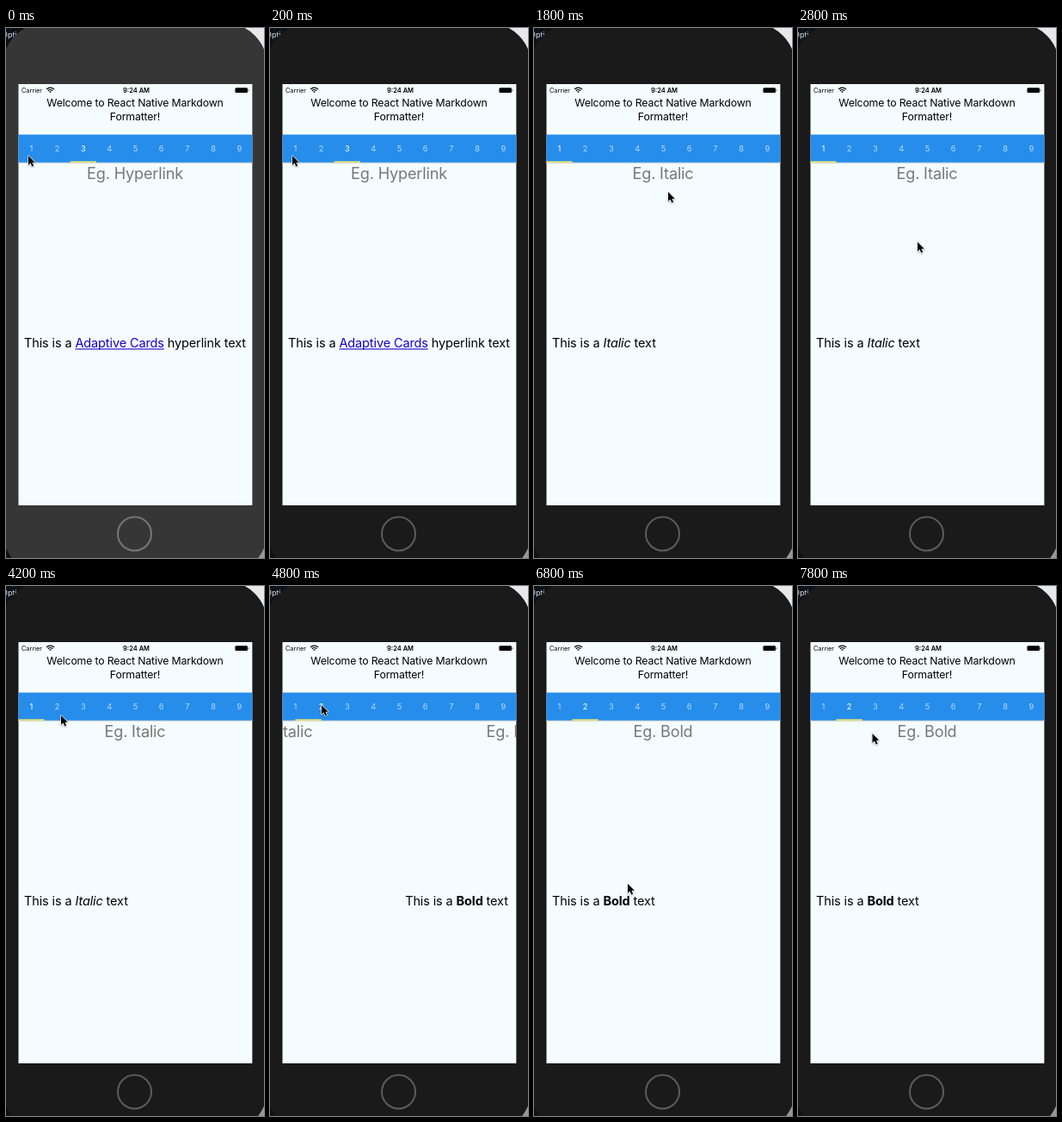
An HTML page with a canvas that plays this animation: 300 by 614 pixels, repeating every 8000 ms.

```html
<!DOCTYPE html>
<html lang="en">
<head>
<meta charset="utf-8">
<title>Markdown formatter demo</title>
<style>
  html, body { margin: 0; width: 100%; height: 100%; overflow: hidden; background: #0b1218; }
  canvas { display: block; width: 300px; height: 614px; }
</style>
</head>
<body>
<canvas id="stage"></canvas>
<script>
const W = 300, H = 614, LOOP = 8000, STEP = 200;
const FONT = 'Inter, Roboto, sans-serif';
const SCREEN = { x: 14.3, y: 65, w: 272.3, h: 488 };
const TAB_W = SCREEN.w / 9;
const LINK = '#1a00c8';

const canvas = document.getElementById('stage');
const ctx = canvas.getContext('2d');
const dpr = window.devicePixelRatio || 1;
canvas.width = W * dpr;
canvas.height = H * dpr;

const pages = [
  { title: 'Eg. Italic', parts: [['This is a '], ['Italic', 'italic'], [' text']] },
  { title: 'Eg. Bold', parts: [['This is a '], ['Bold', 'bold'], [' text']] },
  { title: 'Eg. Hyperlink', parts: [['This is a '], ['Adaptive Cards', 'link'], [' hyperlink text']] }
];

// Eased pointer moves
const home = { x: 26, y: 148 };
const moves = [
  { from: 600, to: 800, x: 30, y: 138 },
  { from: 1000, to: 1800, x: 156, y: 190 },
  { from: 1800, to: 2400, x: 161, y: 182 },
  { from: 2600, to: 2800, x: 139, y: 248 },
  { from: 2800, to: 3200, x: 125, y: 334 },
  { from: 3400, to: 4200, x: 64, y: 150 },
  { from: 4200, to: 4600, x: 60, y: 138 },
  { from: 5000, to: 5600, x: 152, y: 184 },
  { from: 6200, to: 6800, x: 109, y: 345 },
  { from: 7000, to: 7800, x: 86.5, y: 171 }
];

const progress = (t, from, to) => Math.min(1, Math.max(0, (t - from) / (to - from)));
const ease = p => p * p * (3 - 2 * p);
const mix = (a, b, p) => a + (b - a) * p;

function pointerAt(t) {
  return moves.reduce((pos, m) => {
    const p = ease(progress(t, m.from, m.to));
    return { x: mix(pos.x, m.x, p), y: mix(pos.y, m.y, p) };
  }, home);
}

function pageAt(t) {
  return t < 1000 ? 2 : ease(progress(t, 4600, 5000));
}

function rect(x, y, w, h, color) {
  ctx.fillStyle = color;
  ctx.fillRect(x, y, w, h);
}

function pill(x, y, w, h, r, color) {
  ctx.beginPath();
  ctx.roundRect(x, y, w, h, r);
  ctx.fillStyle = color;
  ctx.fill();
}

function arc(x, y, r, color, width, from = 0, to = Math.PI * 2) {
  ctx.beginPath();
  ctx.arc(x, y, r, from, to);
  ctx.strokeStyle = color;
  ctx.lineWidth = width;
  ctx.stroke();
}

function text(str, x, y, size, { color = '#000', align = 'left', style = '', gap = 0 } = {}) {
  ctx.font = `${style} ${size}px ${FONT}`;
  ctx.letterSpacing = gap + 'px';
  ctx.textAlign = align;
  ctx.fillStyle = color;
  ctx.fillText(str, x, y);
  return ctx.measureText(str).width;
}

function drawPhone(dimmed) {
  rect(0, 0, W, H, '#0b1218');
  rect(W / 2, 0, W / 2, H / 2, '#e6e8e9');
  rect(W / 2, H / 2, W / 2, H / 2, '#999');
  text('Opti', -5, 11, 9, { color: '#dde' });
  pill(-4, -6, W + 8, 639, 50, dimmed ? '#1a1a1a' : '#363636');
  arc(149.5, 586, 19.5, dimmed ? '#5c5c5c' : '#777', 2);
}

function drawStatus() {
  text('Carrier', 18, 75, 7.3, { gap: 0.03 });
  text('9:24 AM', 151.5, 75, 7.5, { style: '600', align: 'center' });
  for (let r = 1.2; r < 7; r += 2.4) {
    arc(51.5, 75.2, r, '#000', 1.3, -Math.PI * 0.76, -Math.PI * 0.24);
  }
  pill(266.4, 69.3, 14.6, 5.8, 1.4, '#000');
  rect(281.6, 71.2, 0.9, 2.2, '#555');
}

function drawTabs(page) {
  rect(SCREEN.x, 155, SCREEN.w, 2, '#d3dade');
  rect(SCREEN.x, 123.5, SCREEN.w, 32.2, '#268deb');
  for (let i = 0; i < 9; i++) {
    const active = Math.round(page) === i;
    text(i + 1, SCREEN.x + TAB_W * (i + 0.5), 143.4, 9.3, {
      color: active ? '#fff' : 'rgba(255,255,255,.68)', align: 'center'
    });
  }
  rect(SCREEN.x + TAB_W * page, 154.3, TAB_W, 1.7, '#ece372');
}

function drawPage({ title, parts }, dx) {
  text(title, 150 + dx, 175.3, 18.1, { color: '#777', align: 'center', gap: -0.17 });
  let x = 21 + dx;
  for (const [str, kind] of parts) {
    const link = kind === 'link';
    const w = text(str, x, 370.3, 14.5, {
      color: link ? LINK : '#000', style: link ? '' : kind, gap: -0.12
    });
    if (link) rect(x, 371.4, w, 1.1, LINK);
    x += w;
  }
}

function drawScreen(page) {
  const { x, y, w, h } = SCREEN;
  ctx.save();
  ctx.beginPath();
  ctx.rect(x, y, w, h);
  ctx.clip();
  rect(x, y, w, h, '#f5fcff');
  drawStatus();
  const heading = { align: 'center', gap: -0.16 };
  text('Welcome to React Native Markdown', 150, 91.3, 12.3, heading);
  text('Formatter!', 150, 107.2, 12.3, heading);
  pages.forEach((p, i) => {
    const offset = i - page;
    if (Math.abs(offset) < 1) drawPage(p, offset * w);
  });
  drawTabs(page);
  ctx.restore();
}

function drawPointer({ x, y }) {
  const arrow = new Path2D('M0 0V11.6L2.7 9.1 4.6 13.5 6.6 12.6 4.8 8.4 8.4 8.3Z');
  ctx.save();
  ctx.translate(x, y);
  ctx.scale(0.93, 0.93);
  ctx.shadowColor = 'rgba(0,0,0,.3)';
  ctx.shadowBlur = 2 * dpr;
  ctx.shadowOffsetY = dpr;
  ctx.strokeStyle = '#fff';
  ctx.lineWidth = 1.4;
  ctx.lineJoin = 'round';
  ctx.stroke(arrow);
  ctx.shadowColor = 'transparent';
  ctx.fillStyle = '#000';
  ctx.fill(arrow);
  ctx.restore();
}

function draw(now) {
  const t = Math.floor((now % LOOP) / STEP) * STEP;
  ctx.setTransform(dpr, 0, 0, dpr, 0, 0);
  drawPhone(t >= STEP);
  drawScreen(pageAt(t));
  drawPointer(pointerAt(t));
}

const start = performance.now();
function tick() {
  draw(performance.now() - start);
  requestAnimationFrame(tick);
}
tick();
</script>
</body>
</html>
```
